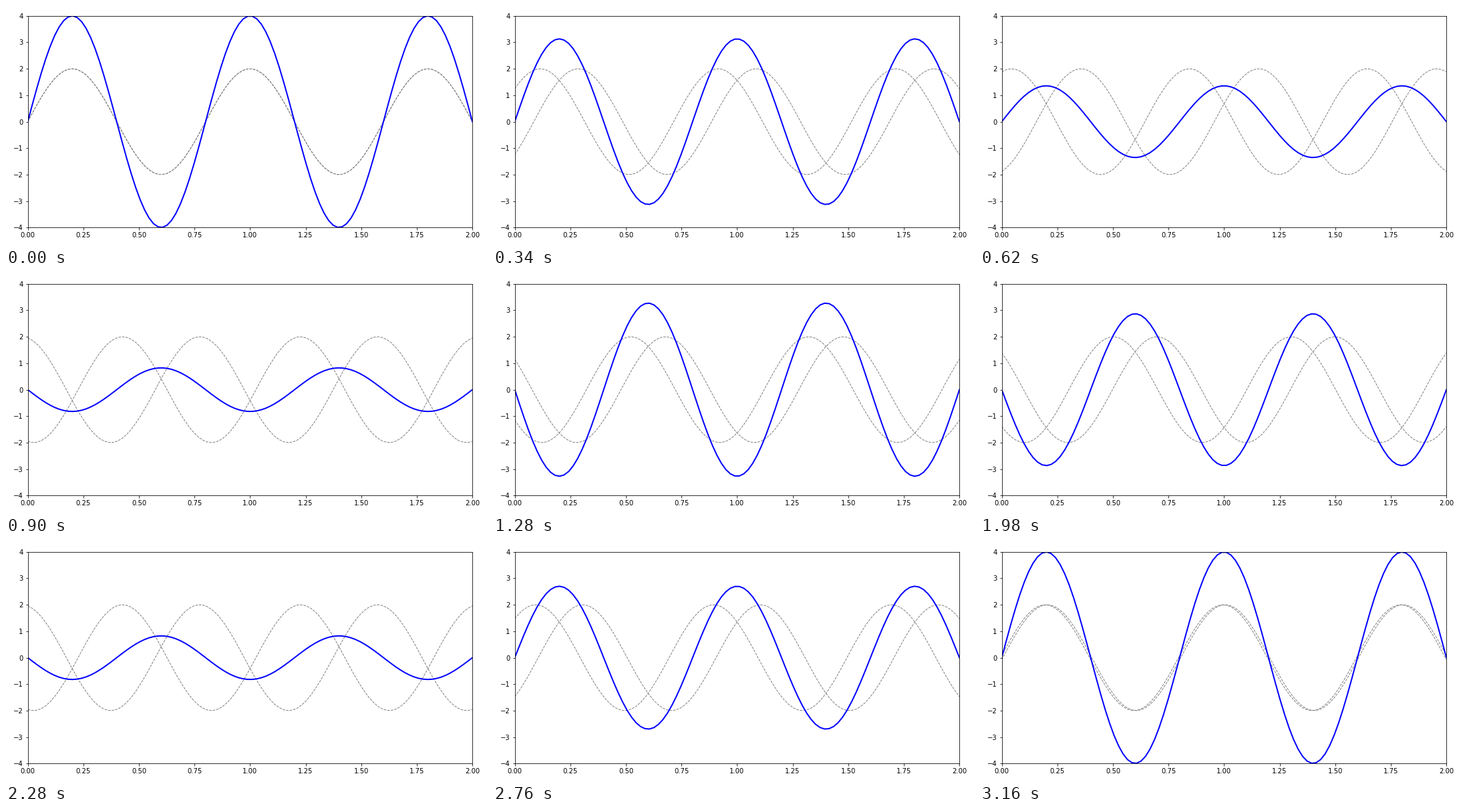
Write a matplotlib script that moves like this. It is 720x360 px and loops after 3.18 s.

```python
import numpy as np
import matplotlib.pyplot as plt
from matplotlib.animation import FuncAnimation

FRAMES = 159
INTERVAL = 20  # ms
AMPLITUDE = 2
WAVELENGTH = 0.8

x = np.linspace(0, 2, 100)
k = 2 * np.pi / WAVELENGTH

fig, ax = plt.subplots(figsize=(10, 5), dpi=72)
ax.set_xlim(0, 2)
ax.set_ylim(-4, 4)

right, = ax.plot([], [], color="gray", ls="--", lw=1)
left, = ax.plot([], [], color="gray", ls="--", lw=1)
total, = ax.plot([], [], color="blue", lw=2)
fig.tight_layout()


def update(i):
    """Two opposite travelling waves and the standing wave they add up to."""
    phase = 2 * np.pi * i / FRAMES
    y_right = AMPLITUDE * np.sin(k * x - phase)
    y_left = AMPLITUDE * np.sin(k * x + phase)
    right.set_data(x, y_right)
    left.set_data(x, y_left)
    total.set_data(x, y_right + y_left)
    return right, left, total


anim = FuncAnimation(fig, update, frames=FRAMES, interval=INTERVAL,
                     repeat=True, repeat_delay=0, blit=False)
plt.show()
```
